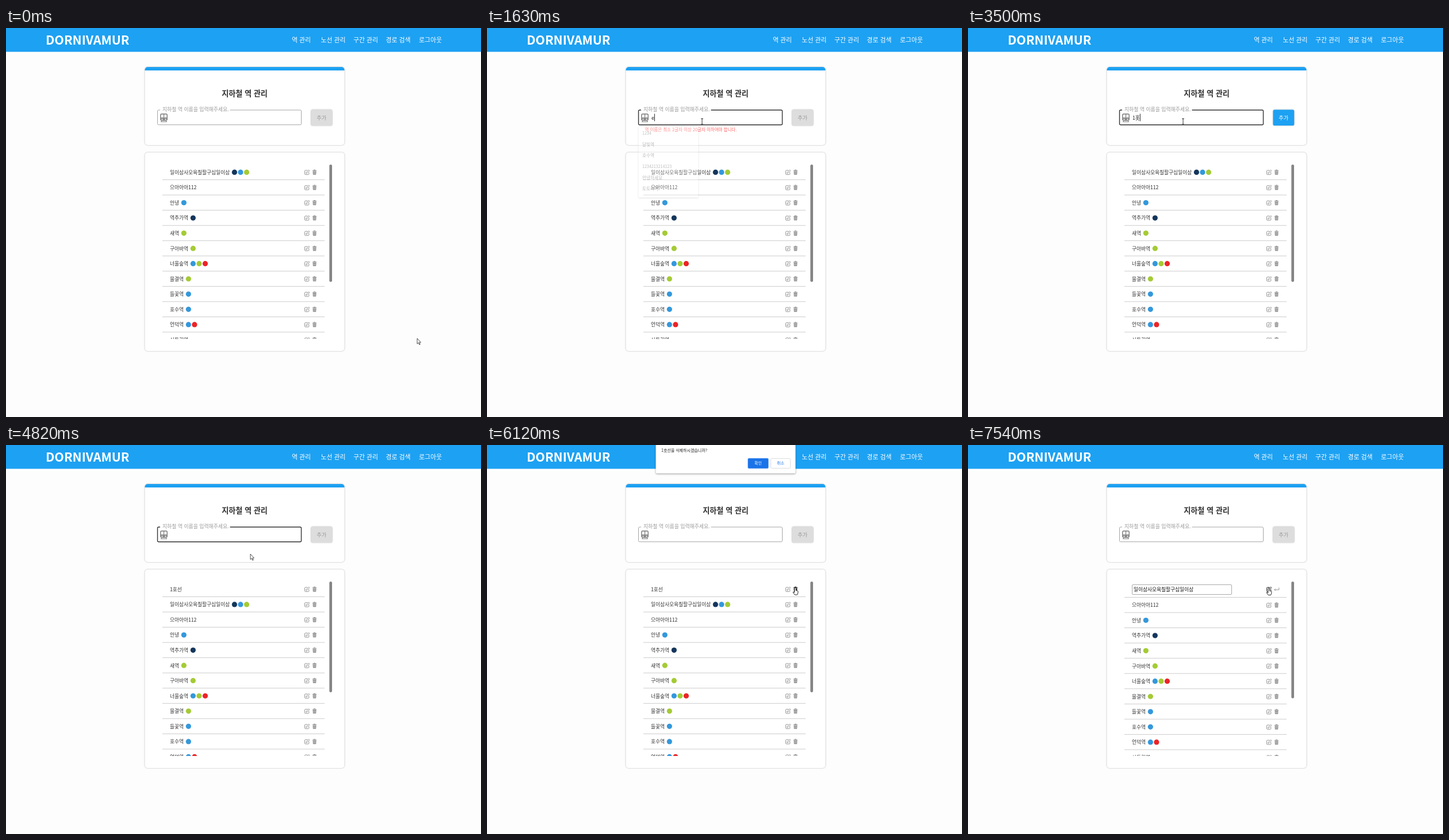
Write an HTML page that moves like this. It is 826x678 px and loops after 8 s.

```html
<!DOCTYPE html>
<html lang="ko">
<head>
<meta charset="utf-8">
<title>지하철 역 관리</title>
<style>
html, body { margin: 0; width: 100%; height: 100%; overflow: hidden; background: #fdfdfd; }
svg { display: block; font-family: "Noto Sans CJK KR", "Noto Sans KR", sans-serif; }
.card { filter: drop-shadow(0 .8px .9px rgba(0,0,0,.32)); }
.popup { filter: drop-shadow(0 1px 1.5px rgba(0,0,0,.4)); }
.line { fill: none; stroke-linejoin: round; }
</style>
</head>
<body>
<svg id="stage" width="826" height="678" viewBox="0 0 826 678">
  <defs><clipPath id="list"><path d="M264 236H570V542H264Z"/></clipPath></defs>
  <g id="base"></g>
  <g id="live"></g>
</svg>
<script>
const LOOP = 8000, STEP = 78, BLINK = 535, ROW = 26.55, CHAR = 8.004;
const BLUE = "#1da1f2", GRAY = "#8b8b8b", INK = "#303030";
const COLORS = { n: "#14365c", b: "#3498db", g: "#a4cb35", r: "#ec2427" };

// Name and line colours of each station
const STATIONS = [
  ["일이삼사오육칠팔구십일이삼", "nbg"], ["으아아아112", ""], ["안녕", "b"], ["역추가역", "n"],
  ["새역", "g"], ["구아바역", "g"], ["너울숲역", "bgr"], ["물결역", "g"],
  ["들꽃역", "b"], ["호수역", "b"], ["언덕역", "br"], ["산들길역", ""]
];
const HISTORY = ["1234", "달빛역", "호수역", "1234213214123", "안녕하세요", "토토리역"];
const MATCHES = ["1234", "1234213214123", "1호선"];

// Start time and content of the input
const TYPED = [
  [690, ""], [1550, "e"], [1710, "ee"], [1860, "eee"], [2170, "eeee"], [2330, "ee"], [2410, "e"],
  [2560, ""], [2870, "1"], [3180, "1ㅎ"], [3260, "1호"], [3500, "1홋"], [3580, "1호선"], [4280, ""]
];
// First step, last step, target x, target y
const MOVES = [
  [70, 460, 372, 144], [540, 540, 371, 152], [1010, 1090, 374, 163], [4820, 4820, 425, 190],
  [4900, 5550, 536, 248.5], [6440, 6600, 528, 248.5], [6680, 6750, 523, 249],
  [6900, 6990, 523, 248], [7460, 7540, 523, 249]
];

const text = (x, y, size, fill, str, extra = "") =>
  `<text x="${x}" y="${y}" font-size="${size}" fill="${fill}" ${extra}>${str}</text>`;
const rect = (x, y, w, h, r, fill, extra = "") =>
  `<rect x="${x}" y="${y}" width="${w}" height="${h}" rx="${r}" fill="${fill}" ${extra}/>`;
const line = (d, stroke, width = 1) =>
  `<path class="line" d="${d}" stroke="${stroke}" stroke-width="${width}"/>`;
const at = (x, y, content) => `<g transform="translate(${x} ${y})">${content}</g>`;
const fade = (t, from, to, length = 150) =>
  Math.max(0, Math.min(1, (t - from) / length + .5, (to - t) / length + .5));

const MIDDLE = 'text-anchor="middle"', BOLD = 'font-weight="700"', MEDIUM = 'font-weight="500"';

function base() {
  const nav = [[497, "역 관리"], [547.5, "노선 관리"], [604, "구간 관리"], [660.5, "경로 검색"], [718, "로그아웃"]];
  return rect(0, 0, 826, 41.5, 0, BLUE) +
    text(69, 28.8, 21.5, "#fff", "DORNIVAMUR", BOLD) +
    nav.map(([x, label]) => text(x, 24.7, 10.9, "#fff", label, MEDIUM)).join("") +
    rect(241.5, 68, 347, 136, 5, "#fff", 'class="card"') +
    `<path d="M241.5 74V73a5 5 0 0 1 5-5H583.5a5 5 0 0 1 5 5V74Z" fill="${BLUE}"/>` +
    rect(241.5, 217, 347, 346, 5, "#fff", 'class="card"') +
    text(415, 119.2, 13.1, INK, "지하철 역 관리", MIDDLE + BOLD);
}

const train = at(274.5, 156,
  rect(-5.7, -6.2, 11.4, 11.2, 2.2, "#fff", `stroke="${GRAY}" stroke-width="1.7"`) +
  line("M-5.5 .8H5.5M0-6V.8", GRAY, 1.5) +
  `<path d="M-5.5 1H5.5V4H-5.5ZM-2 4H2V6H-2Z" fill="${GRAY}"/>` +
  `<circle cx="-3" cy="3" r="1" fill="#fff"/><circle cx="3" cy="3" r="1" fill="#fff"/>` +
  line("M-3 5-5 7.5H5L3 5", GRAY, 1.2));

const editIcon = (y, color) => at(523.3, y,
  line("M1-3.4H-2.6Q-3.8-3.4-3.8-2.3V2.9Q-3.8 4-2.6 4H2.3Q3.5 4 3.5 2.9V0", color, .9) +
  line("M-1.6 2-1.1.1 3.2-4.2 4.6-2.8.3 1.5Z", color, .9));
const trashIcon = (y, color) => at(536.5, y,
  line("M-3.6-2.8H3.6M-1.4-3V-4.1H1.4V-3", color) +
  `<path d="M-3-1.8H3L2.6 4.2H-2.6Z" fill="${color}"/>` +
  line("M-1.1-.8V3.2M1.1-.8V3.2", "#fff", .6));
const returnIcon = y => at(536.8, y, line("M4-3V.8H-4M-2-1.2-4 .8-2 2.8", GRAY, .9));

const POINTERS = {
  arrow: `<path d="M0 0V9.5L2.2 7.5 3.8 11 5.2 10.4 3.7 7H6.4Z" fill="#fff" stroke="#222" stroke-width=".8"/>`,
  beam: line("M-2-5H2M0-5V5M-2 5H2", "#333"),
  hand: `<path d="M-1.2 1.2a1.2 1.2 0 0 1 2.4 0V5l3 .8q1 .3.8 1.5L4.4 10.6 3.6 12.6H-.8L-4 8.2q.5-1.6 2.8.4Z"
    fill="#fff" stroke="#111" stroke-width=".9"/>`
};

function pointer(t) {
  let x = 715, y = 541;
  for (const [start, end, tx, ty] of MOVES) {
    if (t < start) break;
    const count = Math.round((end - start) / STEP) + 1;
    const p = Math.min(1, (Math.floor((t - start + 8) / STEP) + 1) / count);
    x += (tx - x) * p;
    y += (ty - y) * p;
  }
  const onIcons = x > 518 && x < 541 && y > 244 && y < 262;
  const onField = x > 263 && x < 514 && y > 139 && y < 169;
  return { x, y, kind: onIcons ? "hand" : onField ? "beam" : "arrow",
    hover: !onIcons ? "" : x < 530.5 ? "edit" : "trash" };
}

function form(t) {
  const [since, value] = TYPED.findLast(([time]) => time <= t) || [0, ""];
  const focused = t >= 690 && t < 5630;
  const latin = value.includes("e"), ready = value.length > 1 && !latin;
  const caretOn = focused && !(t >= 2410 && t < 2870) && Math.floor((t - since) / BLINK) % 2 === 0;
  const caretX = 286.5 + [...value].reduce((w, c) => w + (c > "z" ? CHAR : 4.83), 0);
  const error = value.length === 1 ? "역 이름은 최소 2글자 이상 20글자 이하여야 합니다."
    : latin ? "역 이름은 한글과 숫자만 입력할 수 있습니다." : "";
  return rect(263.5, 143, 250, 25.7, 2, "#fff",
      `stroke="${focused ? "#333" : "#a5a5a5"}" stroke-width="${focused ? 1.4 : 1}"`) +
    rect(268, 141, 121.5, 4, 0, "#fff") +
    text(272, 145.1, 8.83, "#999", "지하철 역 이름을 입력해주세요.") + train +
    text(286, 159.6, 8.7, "#222", value) +
    (caretOn ? line(`M${caretX} 149.5V162.5`, "#222") : "") +
    text(274.5, 180.3, 7.48, "#ff5f5f", error) +
    rect(530.5, 142.5, 36.7, 27.5, 2.5, ready ? BLUE : "#ddd", 'class="card"') +
    text(548.7, 159.6, 9.2, ready ? "#fff" : "#999", "추가", MIDDLE + MEDIUM);
}

function stations(t, hover) {
  const added = t >= 4280 && t < 6440, editing = t >= 7140;
  const rows = added ? [["1호선", ""], ...STATIONS] : STATIONS;
  const content = rows.slice(0, 12).map(([name, lines], i) => {
    const y = 251.5 + i * ROW + (editing && i ? 1 : 0);
    const edited = editing && !i;
    const dots = [...lines].map((c, k) =>
      `<circle cx="${293.3 + name.length * CHAR + k * 10.55}" cy="${y - .1}" r="4.6" fill="${COLORS[c]}"/>`);
    const color = icon => !i && hover === icon ? "#111" : GRAY;
    const label = edited
      ? rect(285.5, 243.5, 173, 17, 1.5, "#fff", 'stroke="#aaa"') + text(288, 255.3, 8.7, "#111", name)
      : text(285, y + 3.3, 8.7, INK, name) + dots.join("");
    return label + editIcon(y, color("edit")) + (edited ? returnIcon(y) : trashIcon(y, color("trash"))) +
      line(`M272 ${y + (edited ? 14 : 13)}H554`, "#ccc");
  });
  return `<g clip-path="url(#list)">${content.join("")}</g>` +
    rect(562.3, 238, 4.7, added ? 193 : editing ? 203.5 : 204.5, 2.3, "#858585");
}

function suggestions(items, opacity) {
  if (!opacity) return "";
  const rows = items.map((item, i) =>
    text(270, 186.2 + i * 19.4, /^\d+$/.test(item) ? 7.1 : 7.6, "#222", item));
  return `<g opacity="${opacity}">` +
    rect(263.5, 171, 104, 8.1 + items.length * 19.4, 1, "#fff", 'class="popup"') + rows.join("") + "</g>";
}

function dialog(opacity) {
  if (!opacity) return "";
  return `<g opacity="${opacity}">` + rect(293.5, -8, 243, 57.5, 2, "#fff", 'class="popup"') +
    text(303, 11.8, 7, "#222", "1호선을 삭제하시겠습니까?") +
    rect(453.5, 23, 36, 18, 2, "#1a73e8", 'stroke="#a9c9f7" stroke-width=".7"') +
    text(471.5, 34.2, 7, "#fff", "확인", MIDDLE) +
    rect(493.5, 23.5, 34, 17, 2, "#fff", 'stroke="#dadce0"') +
    text(510.5, 34.2, 7, "#1a73e8", "취소", MIDDLE) + "</g>";
}

function scene(t) {
  const { x, y, kind, hover } = pointer(t);
  return form(t) + stations(t, hover) +
    suggestions(HISTORY, fade(t, 770, 1600)) + suggestions(MATCHES, fade(t, 2940, 3240)) +
    dialog(fade(t, 5760, 6440)) + at(x, y, POINTERS[kind]);
}

const live = document.getElementById("live");
document.getElementById("base").innerHTML = base();
let shown = "";
const startTime = performance.now();
function frame() {
  const markup = scene((performance.now() - startTime) % LOOP);
  if (markup !== shown) live.innerHTML = shown = markup;
  requestAnimationFrame(frame);
}
frame();
</script>
</body>
</html>
```
